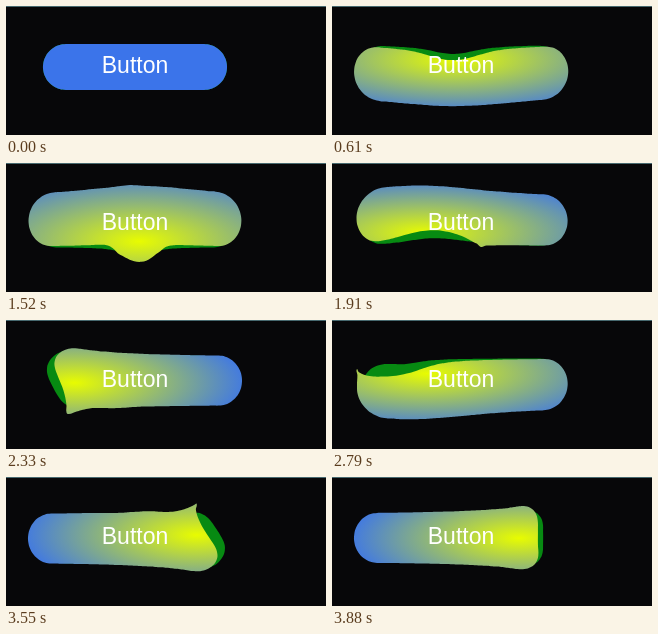
Animation, 320 px wide and 129 px high, one loop 3.91 s. Source, as an HTML page:

```html
<!DOCTYPE html>
<html lang="en">
<head>
<meta charset="utf-8">
<title>Liquid button</title>
<style>
  html, body { margin: 0; width: 100%; height: 100%; overflow: hidden; background: #070709; }
  svg { display: block; width: 320px; height: 129px; }
  text { font: 23px "Liberation Sans", Arial, sans-serif; fill: #fff; text-anchor: middle; }
</style>
</head>
<body>
<svg viewBox="0 0 320 129">
  <defs>
    <radialGradient id="glow" r="0.95">
      <stop offset="0" stop-color="#e8fc00"/>
      <stop offset="1" stop-color="#3b74ea"/>
    </radialGradient>
  </defs>
  <rect width="320" height="1" fill="#47696f"/>
  <path id="back" fill="#078a12"/>
  <path id="front"/>
  <text x="129" y="66.5">Button</text>
</svg>
<script>
const LOOP = 3910, START = 300, FRAME = 30, SUBSTEPS = 2;
const BOX = { x: 37, y: 38, w: 184, h: 46 };
const MARGIN = 40, GAP = 5, SPRING = 0.2, TENSION = 0.4;
const BLUE = '#3b74ea';

// the pointer rests above the button, dives through it, then circles it clockwise
const HOVER = { x: 121, y: 25 };
const ORBIT = { x: 129, y: 62, rx: 104, ry: 37 };
const DIVE_AT = 900, ORBIT_AT = 1700;
const FIRST_ANGLE = -4, LAST_ANGLE = 270, DEG_PER_MS = 0.142;

const front = document.getElementById('front');
const back = document.getElementById('back');
const glow = document.getElementById('glow');
const layers = [
  { el: back, viscosity: 0.5, force: 2 },
  { el: front, viscosity: 0.8, force: 3 }
];

const clamp = k => Math.max(0, Math.min(1, k));
const ease = k => k * k * (3 - 2 * k);

// angle in degrees, clockwise from the bottom
function onOrbit(deg) {
  const a = deg * Math.PI / 180;
  return { x: ORBIT.x - Math.sin(a) * ORBIT.rx, y: ORBIT.y + Math.cos(a) * ORBIT.ry };
}

function pointer(t) {
  if (t >= ORBIT_AT) {
    return onOrbit(Math.min(LAST_ANGLE, FIRST_ANGLE + (t - ORBIT_AT) * DEG_PER_MS));
  }
  const k = ease(clamp((t - DIVE_AT) / (ORBIT_AT - DIVE_AT))), end = onOrbit(FIRST_ANGLE);
  return { x: HOVER.x + (end.x - HOVER.x) * k, y: HOVER.y + (end.y - HOVER.y) * k };
}

function outline() {
  const pts = [], { x, y, w, h } = BOX, r = h / 2, turns = 11;
  const add = (px, py) => pts.push({ ox: px, oy: py, x: px, y: py, vx: 0, vy: 0 });
  const cap = (cx, from) => {
    for (let i = 0; i <= turns; i++) {
      const a = from + Math.PI * i / turns;
      add(cx + Math.cos(a) * r, y + r + Math.sin(a) * r);
    }
  };
  for (let d = r + GAP; d < w - r; d += GAP) add(x + d, y);
  cap(x + w - r, -Math.PI / 2);
  for (let d = w - r - GAP; d > r; d -= GAP) add(x + d, y + h);
  cap(x + r, Math.PI / 2);
  return pts;
}

function push({ points, viscosity, force }, m) {
  for (const p of points) {
    const mx = p.x - m.x, my = p.y - m.y, d = Math.hypot(mx, my) || 1;
    p.vx = (p.vx + (p.ox - p.x) * SPRING + force * mx / d) * viscosity;
    p.vy = (p.vy + (p.oy - p.y) * SPRING + force * my / d) * viscosity;
    p.x += p.vx;
    p.y += p.vy;
  }
}

function smooth(points) {
  const n = points.length, xy = (x, y) => x.toFixed(2) + ' ' + y.toFixed(2);
  const handles = points.map((p, i) => {
    const a = points[(i + n - 1) % n], b = points[(i + 1) % n];
    const len = Math.hypot(b.x - a.x, b.y - a.y) || 1;
    const ux = (b.x - a.x) / len * TENSION, uy = (b.y - a.y) / len * TENSION;
    const da = Math.hypot(p.x - a.x, p.y - a.y), db = Math.hypot(p.x - b.x, p.y - b.y);
    return { before: xy(p.x - ux * da, p.y - uy * da), after: xy(p.x + ux * db, p.y + uy * db) };
  });
  let d = 'M' + xy(points[0].x, points[0].y);
  for (let i = 0; i < n; i++) {
    const j = (i + 1) % n;
    d += `C${handles[i].after} ${handles[j].before} ${xy(points[j].x, points[j].y)}`;
  }
  return d + 'Z';
}

let step = -1;

function reset() {
  step = 0;
  for (const layer of layers) layer.points = outline();
}

function draw(t) {
  const target = t < START ? 0 : (Math.floor((t - START) / FRAME) + 1) * SUBSTEPS;
  if (target === step) return;
  if (step < 0 || target < step) reset();
  const at = n => pointer(START + n * FRAME / SUBSTEPS);
  while (step < target) {
    const m = at(step++);
    for (const layer of layers) push(layer, m);
  }
  for (const layer of layers) layer.el.setAttribute('d', smooth(layer.points));
  const m = at(step);
  glow.setAttribute('cx', (m.x - BOX.x + MARGIN) / (BOX.w + 2 * MARGIN));
  glow.setAttribute('cy', (m.y - BOX.y + MARGIN) / (BOX.h + 2 * MARGIN));
  front.setAttribute('fill', step ? 'url(#glow)' : BLUE);
}

const origin = performance.now();
function tick() {
  draw((performance.now() - origin) % LOOP);
  requestAnimationFrame(tick);
}
tick();
</script>
</body>
</html>
```
